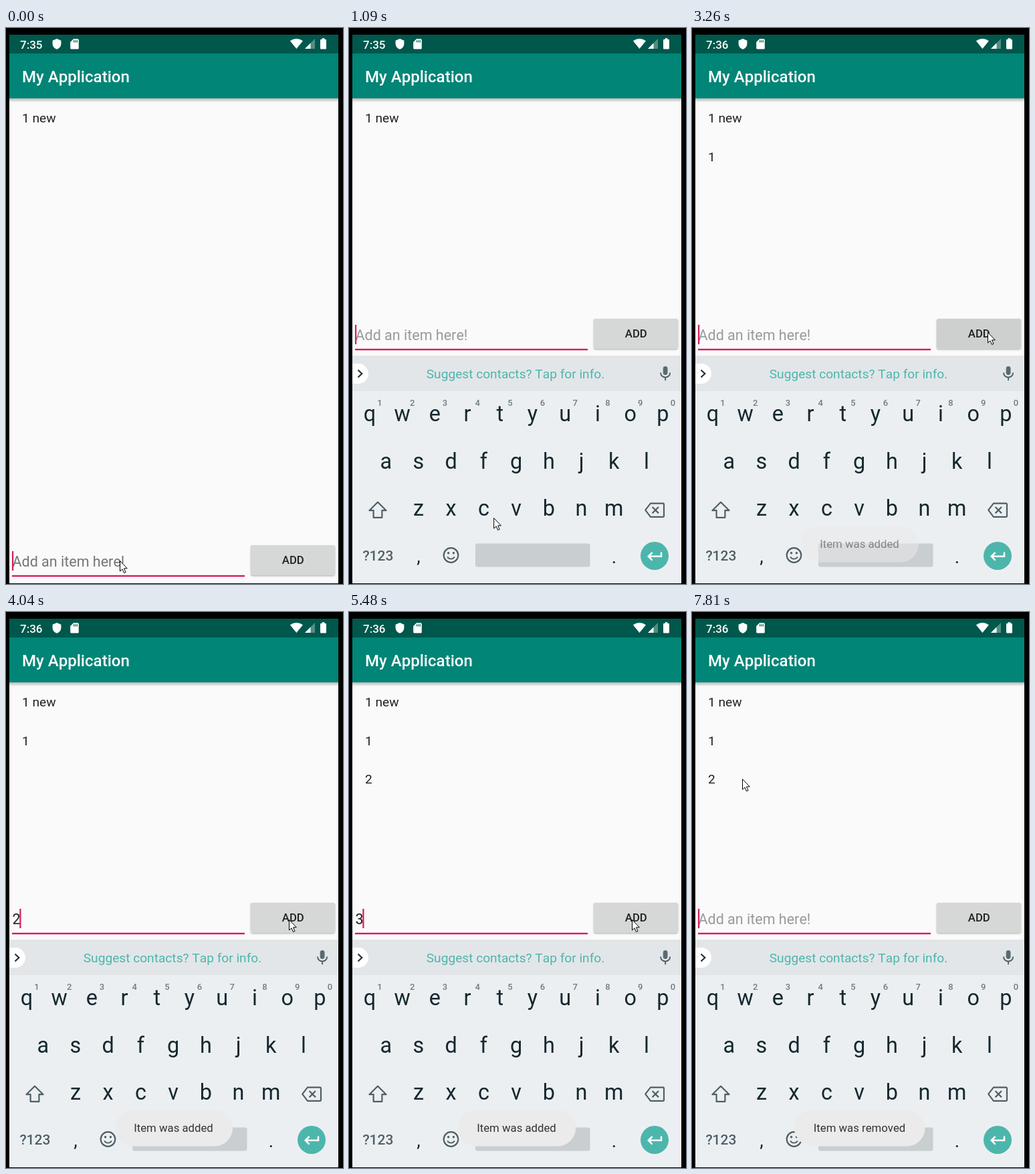
Recreate the animation shown at these times as an HTML page. Size 504 by 830 pixels, loop 8 s.

```html
<!DOCTYPE html>
<html lang="en">
<head>
<meta charset="utf-8">
<title>My Application</title>
<style>
html, body { margin: 0; width: 100%; height: 100%; overflow: hidden; background: #000; }
svg { display: block; width: 504px; height: 830px; font-family: Roboto, "Open Sans", sans-serif; font-kerning: none; }
.med { font-weight: 500; }
.mid { text-anchor: middle; }
.row { font-size: 19.15px; fill: #212121; }
.field { font-size: 21.5px; }
.small { font-size: 16.76px; }
.key { font-size: 32.4px; fill: #14282f; }
.mark { font-size: 28px; }
.digit { font-size: 13px; fill: #727b80; }
.line { fill: none; stroke: #4f5f67; stroke-width: 2.2; }
</style>
</head>
<body>
<svg viewBox="0 0 504 830">
  <defs>
    <clipPath id="screen"><rect x="5" y="10" width="492" height="819"/></clipPath>
    <clipPath id="face"><rect x="366" y="434" width="126" height="44.5" rx="2.4"/></clipPath>
    <linearGradient id="fade" x2="0" y2="1">
      <stop stop-color="#000" stop-opacity=".28"/>
      <stop offset="1" stop-color="#000" stop-opacity="0"/>
    </linearGradient>
    <filter id="lift" x="-10%" y="-20%" width="120%" height="150%">
      <feDropShadow dx="0" dy="1.5" stdDeviation="1.3" flood-opacity=".32"/>
    </filter>
  </defs>

  <g clip-path="url(#screen)">
    <rect x="5" y="10" width="492" height="820" fill="#fafafa"/>
    <rect x="5" y="105" width="492" height="6" fill="url(#fade)"/>
    <rect x="5" y="38" width="492" height="67" fill="#008577"/>
    <rect x="5" y="10" width="492" height="28" fill="#00574b"/>

    <g fill="#fff">
      <text id="clock" class="med" x="21" y="30.5" font-size="17">7:35</text>
      <path d="M76 16l6.4 2.7v4.6c0 4-2.7 7.5-6.4 8.5-3.7-1-6.4-4.5-6.4-8.5v-4.6z"/>
      <path d="M101 16.3h6.2q1.6 0 1.6 1.6v12q0 1.6-1.6 1.6h-9.4q-1.6 0-1.6-1.6v-8.8z"/>
      <path d="M101.6 18.2v3.2M104 18.2v3.2M106.4 18.2v3.2" stroke="#00574b" stroke-width="1.2"/>
      <path d="M434.4 31l-9.6-11.8q9.6-6.4 19.2 0z"/>
      <path d="M462 16v15h-15z" opacity=".32"/>
      <path d="M455.5 22.5V31H447z"/>
      <path d="M472.6 17v-1.8h3.8V17h1.6q1 0 1 1v12.4q0 1-1 1h-7q-1 0-1-1V18q0-1 1-1z"/>
      <text class="med" x="23.9" y="81" font-size="24.05">My Application</text>
    </g>

    <g id="list"></g>

    <g id="bar">
      <rect x="9" y="478.8" width="348" height="2.4" fill="#d81b60"/>
      <text id="hint" class="field" x="9.5" y="466">Add an item here!</text>
      <text id="value" class="field" x="9.5" y="466" fill="#212121"></text>
      <rect id="caret" y="443" width="2.2" height="29" fill="#d81b60"/>
      <rect x="366" y="434" width="126" height="44.5" rx="2.4" fill="#d6d7d7" filter="url(#lift)"/>
      <circle id="ripple" cx="427" cy="456" clip-path="url(#face)"/>
      <text class="med mid small" x="429.3" y="462" fill="#212121">ADD</text>
    </g>

    <g id="board">
      <rect x="5" y="489" width="492" height="390" fill="#eceff1"/>
      <rect x="5" y="489" width="492" height="53" fill="#e2e6e9"/>
      <path d="M5 501h9a15 15 0 0 1 0 30h-9z" fill="#fff"/>
      <path d="M13.5 510.5l5.8 5.5-5.8 5.5" class="line" style="stroke:#263238"/>
      <text class="mid" x="249" y="523.3" font-size="19.15" fill="#4db6ac">Suggest contacts? Tap for info.</text>
      <rect x="469.7" y="505" width="6.8" height="13" rx="3.4" fill="#5a6a72"/>
      <path d="M466 514.5a7.1 7 0 0 0 14.2 0M473.1 521.5v4.8" class="line" style="stroke-width:1.9"/>
      <g id="keys"></g>
      <path d="M43 707.8l12.6 12.4h-6.2v10.6H36.6v-10.6h-6.2z" class="line" stroke-linejoin="round"/>
      <path d="M451 709.6h18.4q1.6 0 1.6 1.6v17q0 1.6-1.6 1.6H451l-7.8-10.1z" class="line" stroke-linejoin="round"/>
      <path d="M453.6 715l9.4 9.4m0-9.4l-9.4 9.4" class="line"/>
      <text class="med mid" x="43.4" y="795" font-size="21" fill="#4f5f67">?123</text>
      <text class="key mark mid" x="104" y="798">,</text>
      <text class="key mark mid" x="396.5" y="798.5">.</text>
      <circle cx="152.5" cy="787" r="10.8" class="line"/>
      <circle cx="148.6" cy="783.8" r="1.7" fill="#4f5f67"/>
      <circle cx="156.4" cy="783.8" r="1.7" fill="#4f5f67"/>
      <path d="M147.2 789.4a5.8 5.4 0 0 0 10.6 0" class="line" style="stroke-width:1.9"/>
      <rect x="189" y="769.5" width="171.5" height="35" rx="3" fill="#c9ced1"/>
      <circle cx="457" cy="788" r="21" fill="#4db6ac"/>
      <path d="M467 782.4v6.4H448m5.6-5.8l-5.8 5.8 5.8 5.8" fill="none" stroke="#fff" stroke-width="2.5"/>
    </g>

    <g id="toast">
      <rect id="pill" y="743" height="54.5" rx="27" fill="#ebebeb"/>
      <text id="note" class="mid small" x="250.5" y="776" fill="#333"></text>
    </g>
  </g>

  <path id="mouse" d="M.5.5V16L4 12.8l2.5 5.7 2.5-1.1-2.5-5.6h4.8z" fill="#fff" stroke="#000"/>
</svg>

<script>
const LOOP = 8000;
const $ = id => document.getElementById(id);
const set = (el, attrs) => { for (const k in attrs) el.setAttribute(k, attrs[k]); };
const clamp = x => Math.min(1, Math.max(0, x));
const ease = x => x * x * (3 - 2 * x);

function addText(parent, cls, x, y, str) {
  const el = document.createElementNS('http://www.w3.org/2000/svg', 'text');
  set(el, { class: cls, x, y });
  el.textContent = str;
  parent.append(el);
  return el;
}

// Keys sit on one grid; shorter rows are centred.
const PITCH = 48.72;
const addRow = (str, cls, mid, y) => [...str].forEach((ch, i) =>
  addText($('keys'), cls, mid + (i - (str.length - 1) / 2) * PITCH, y, ch));
['qwertyuiop', 'asdfghjkl', 'zxcvbnm'].forEach((str, i) => addRow(str, 'key mid', 250.1, 587 + i * 70.5));
addRow('1234567890', 'digit med mid', 265.2, 563.5);

const rows = ['1 new', '1', '2', '3'].map((str, i) => addText($('list'), 'row', 24, 141 + i * 57.5, str));

const OPEN = 140;               // keyboard starts to rise
const MINUTE = 2840;            // clock ticks over
const TYPED = [2130, 4040, 5310];
const PRESSED = [2960, 4580, 5770];
const REMOVED = 7320;
const CLEAR = 110, UPDATE = 240, BLINK = 480;

// Pointer stops: arrival time, x, y.
const STOPS = [[0, 170, 795], [300, 181, 795], [1240, 398, 400], [2840, 442, 454],
  [3890, 423, 459], [6110, 169, 303], [7260, 75, 292], [7810, 75, 249]];

function pointer(t) {
  let [, x, y] = STOPS[0];
  for (const [end, nx, ny] of STOPS.slice(1)) {
    const k = ease(clamp((t - end + 200) / 200));
    x += (nx - x) * k;
    y += (ny - y) * k;
  }
  return [x, y];
}

function draw(t) {
  const past = (list, delay = 0) => list.filter(at => at + delay <= t).length;
  const latest = (list, delay = 0) => list[past(list, delay) - 1];

  const [mx, my] = pointer(t);
  set($('mouse'), { transform: `translate(${mx} ${my})` });

  const open = t >= OPEN;
  const drop = 340 * Math.min(1, Math.exp((OPEN - t) / 28));
  set($('board'), { transform: `translate(0 ${drop})` });
  set($('bar'), { transform: `translate(0 ${open ? 0 : 338})` });

  const typed = past(TYPED);
  const value = typed > past(PRESSED, CLEAR) ? typed : '';
  $('value').textContent = value;
  set($('hint'), { fill: open ? '#999' : '#757575', opacity: value ? 0 : 1 });

  const edited = Math.max(60, latest(TYPED) ?? 0, (latest(PRESSED, CLEAR) ?? -CLEAR) + CLEAR);
  const lit = t < edited || Math.floor((t - edited) / BLINK) % 2 === 0;
  set($('caret'), { x: value ? 20.3 : 9, opacity: lit ? 1 : 0 });

  const held = t - (latest(PRESSED) ?? -LOOP);
  set($('ripple'), { r: held * .52, opacity: .15 * clamp((350 - held) / 200) });

  const removed = past([REMOVED], UPDATE);
  const count = 1 + past(PRESSED, UPDATE) - removed;
  rows.forEach((row, i) => set(row, { opacity: i < count ? 1 : 0 }));

  const shown = latest([...PRESSED, REMOVED], 190);
  set($('toast'), { opacity: shown ? clamp((t - shown - 190) / 220) : 0 });
  const gone = shown === REMOVED;
  $('note').textContent = gone ? 'Item was removed' : 'Item was added';
  set($('pill'), gone ? { x: 153, width: 195.5 } : { x: 163, width: 176 });

  $('clock').textContent = t < MINUTE ? '7:35' : '7:36';
}

const start = performance.now();
function tick() {
  draw((performance.now() - start) % LOOP);
  requestAnimationFrame(tick);
}
tick();
</script>
</body>
</html>
```
